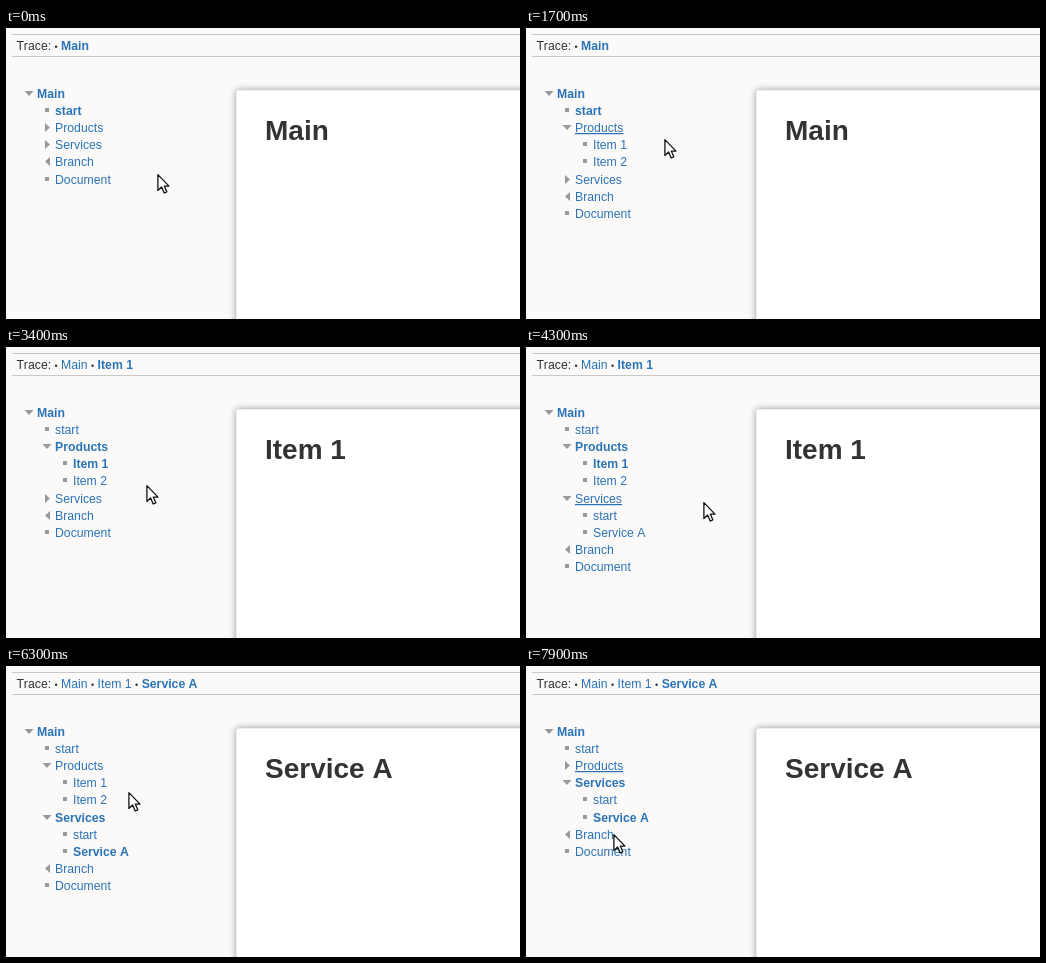
Write an HTML page that moves like this. It is 514 px wide and 291 px high and loops after 8000 ms.

```html
<!DOCTYPE html>
<html lang="en">
<head>
<meta charset="utf-8">
<title>Sidebar tree navigation</title>
<style>
  html, body { margin: 0; width: 100%; height: 100%; overflow: hidden; background: #fbfaf9; }
  #stage { position: relative; width: 514px; height: 291px; overflow: hidden; }
  #page {
    position: absolute; left: 230px; top: 62px; width: 400px; height: 400px;
    background: #fff; border: 1px solid #eee; border-radius: 2px;
    box-sizing: border-box; box-shadow: 0 0 7px #999;
  }
  svg { position: absolute; left: 0; top: 0; }
  text {
    font: 12.25px "Liberation Sans", Arial, sans-serif; font-kerning: none;
    fill: #333; white-space: pre;
  }
  .link { fill: #2b73b7; }
  .bold { font-weight: bold; }
  .hover { text-decoration: underline; }
  .sep { font-size: 9px; }
  .title { font-size: 28px; font-weight: bold; }
  .mark { fill: #999; }
  .pointer { fill: #fff; stroke: #111; stroke-width: 1.3; stroke-linejoin: round; }
</style>
</head>
<body>
<div id="stage">
  <div id="page"></div>
  <svg width="514" height="291" viewBox="0 0 514 291">
    <path d="M6 6.5H514M6 28.5H514" stroke="#c8c8c8"/>
    <g id="scene"></g>
    <g id="cursor" class="pointer"></g>
  </svg>
</div>
<script>
const LOOP = 8000, STEP = 100, SLIDE = 200;
const LINE = 17.15, FIRST = 69.8, LEFT = 30.5, INDENT = 18.375;
const scene = document.getElementById('scene');
const cursor = document.getElementById('cursor');

const ARROW = '<path d="M.9 .6V16.4L4.6 13L7.2 19L9.8 17.8L7.3 12.1H12Z"/>';
const HAND =
  '<path d="M-1.6 9V2a1.6 1.6 0 0 1 3.2 0V6q1.8-.8 3.2 .4q1.8-.7 3.2 .6q3.6-.6 4 2.2V12' +
  'q0 1.6-1.4 3V16.4H1V15L-3.7 10.4q-1.2-2 .2-2.6q1.2-.2 1.9 1.2Z"/>' +
  '<path d="M1.6 6V9M4.8 6.6V9M8 7.2V9.2M3 11.4V13.6M5.6 11.4V13.6M8.2 11.4V13.6" stroke-width=".9"/>';

const clamp = v => Math.min(1, Math.max(0, v));
const swing = (t, start) => 0.5 - Math.cos(Math.PI * clamp((t - start) / SLIDE)) / 2;
const glide = k => Math.sin(clamp(k) * Math.PI / 2);

// The pointer goes to each link, then steps aside
const link = y => ({ x: 85, y, hand: true });
const aside = (x, y) => ({ x, y });
const move = (start, end, to) => ({ start, end, to });
const home = aside(151, 146);
const moves = [
  move(400, 500, aside(159, 140)),
  move(500, 900, link(92)),
  move(1300, 1600, aside(161, 108)),
  move(1600, 2100, link(118)),
  move(2400, 2800, aside(165, 131)),
  move(3300, 3800, link(153)),
  move(4100, 4300, aside(177, 155)),
  move(4400, 4900, link(186)),
  move(5100, 5500, aside(175, 174)),
  move(6100, 6600, link(93)),
  move(6900, 7100, aside(174, 107)),
  move(7100, 7800, aside(102, 165)),
  move(7800, 7900, aside(87, 168))
];

function pointer(t) {
  let { x, y } = home, hand = false;
  for (const { start, end, to } of moves) {
    if (t <= start) break;
    const k = glide((t - start) / (end - start));
    x += (to.x - x) * k;
    y += (to.y - y) * k;
    hand = to.hand && t >= end;
  }
  cursor.setAttribute('transform', `translate(${Math.round(x)} ${Math.round(y)})`);
  cursor.innerHTML = hand ? HAND : ARROW;
}

// Tree markers, relative to the centre of the marker column and the baseline
const MARKS = {
  open: 'm-4.5-7h9l-4.5 5z',
  closed: 'm-2-9l5 4.5l-5 4.5z',
  back: 'm3-9v9l-5-4.5z',
  leaf: 'm-2-7h4v4h-4z'
};

function row(y, level, label, mark, bold, hover) {
  const base = Math.round(y), x = Math.round(LEFT + level * INDENT);
  return `<path class="mark" d="M${x - 8} ${base}${MARKS[mark]}"/>` +
    `<text x="${x}" y="${base}" class="link${bold ? ' bold' : ''}${hover ? ' hover' : ''}">${label}</text>`;
}

function branch(id, y, height, content) {
  if (height < 0.5) return '';
  return `<clipPath id="${id}"><rect y="${y + 4.4}" width="230" height="${height}"/></clipPath>` +
    `<g clip-path="url(#${id})">${content}</g>`;
}

function trace(names) {
  const crumbs = names.map((name, i) =>
    ` <tspan class="sep">•</tspan> <tspan class="link${i === names.length - 1 ? ' bold' : ''}">${name}</tspan>`);
  return `<text x="10.4" y="22">Trace:${crumbs.join('')}</text>`;
}

function tree(t, page) {
  const within = (a, b) => t >= a && t < b;
  const expand = 1283, collapse = 6946, expandServices = 4060;
  const products = 2 * LINE * (swing(t, expand) - swing(t, collapse));
  const services = 2 * LINE * swing(t, expandServices);
  const at = n => FIRST + n * LINE;
  const top = at(3) + products, rest = top + services;
  return row(at(0), 0, 'Main', 'open', true) +
    row(at(1), 1, 'start', 'leaf', page === 0) +
    row(at(2), 1, 'Products', within(expand, collapse) ? 'open' : 'closed', page === 1,
      within(900, 2400) || t >= 6600) +
    branch('products', at(2), products,
      row(at(3), 2, 'Item 1', 'leaf', within(3100, 5700), within(2100, 2800)) +
      row(at(4), 2, 'Item 2', 'leaf')) +
    row(top, 1, 'Services', t >= expandServices ? 'open' : 'closed', page === 2, within(3800, 5100)) +
    branch('services', top, services,
      row(top + LINE, 2, 'start', 'leaf') +
      row(top + 2 * LINE, 2, 'Service A', 'leaf', t >= 5800, within(4900, 5800))) +
    row(rest + LINE, 1, 'Branch', 'back') +
    row(rest + 2 * LINE, 1, 'Document', 'leaf');
}

function draw(t) {
  const pages = ['Main', 'Item 1', 'Service A'];
  const page = t >= 5700 ? 2 : t >= 2900 ? 1 : 0;
  scene.innerHTML = trace(pages.slice(0, page + 1)) + tree(t, page) +
    `<text class="title" x="259" y="112">${pages[page]}</text>`;
  pointer(t);
}

let shown = -1;
const began = performance.now();
function tick() {
  const step = Math.floor(((performance.now() - began) % LOOP) / STEP);
  if (step !== shown) draw((shown = step) * STEP);
  requestAnimationFrame(tick);
}
tick();
</script>
</body>
</html>
```
